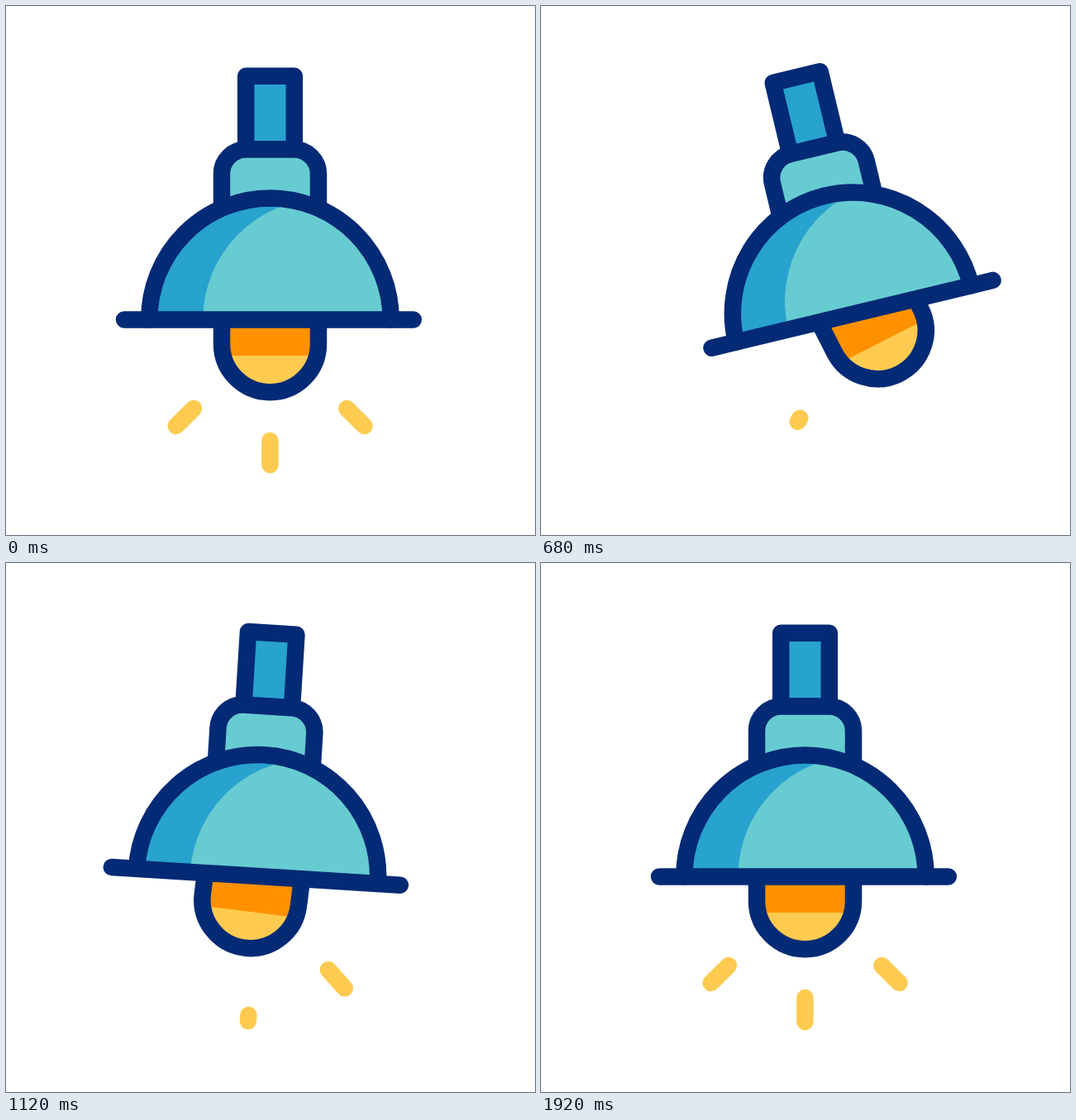
Recreate the animation shown at these times as an HTML page. Size 640 by 640 pixels, loop 2400 ms.

```html
<!DOCTYPE html>
<html lang="en">
<head>
<meta charset="utf-8">
<title>Swinging lamp</title>
<style>
  html, body { margin: 0; width: 100%; height: 100%; overflow: hidden; background: #fff; }
  svg { display: block; width: 100%; height: 100%; }
  .ink { stroke: #032a75; stroke-width: 20.5; stroke-linecap: round; stroke-linejoin: round; }
  .ray { stroke: #fecb50; stroke-width: 20.5; stroke-linecap: round; }
  .blue { fill: #28a2ce; }
  .teal { fill: #67ccd1; }
  .none { fill: none; }
</style>
</head>
<body>
<svg viewBox="0 0 640 640">
  <defs>
    <clipPath id="domeClip"><path d="M173.3 379.4A146.2 147 0 0 1 465.7 379.4Z"/></clipPath>
    <clipPath id="bulbClip"><path d="M261 366V408.7A58.5 58.5 0 0 0 378 408.7V366Z"/></clipPath>
  </defs>
  <g id="lamp">
    <g id="bulb">
      <g clip-path="url(#bulbClip)">
        <rect x="250" y="360" width="140" height="120" fill="#fecb50"/>
        <rect x="250" y="360" width="140" height="63" fill="#ff9100"/>
      </g>
      <path class="ink none" d="M261 372V408.7A58.5 58.5 0 0 0 378 408.7V372"/>
    </g>
    <rect class="ink blue" x="290.2" y="84.8" width="58.6" height="88.6"/>
    <path class="ink teal" d="M261 250V203A29.5 29.5 0 0 1 290.5 173.5H348.5A29.5 29.5 0 0 1 378 203V250"/>
    <g clip-path="url(#domeClip)">
      <rect class="blue" x="160" y="220" width="320" height="170"/>
      <circle class="teal" cx="384.5" cy="379.4" r="146.2"/>
      <rect class="teal" x="384" y="220" width="100" height="170"/>
    </g>
    <path class="ink none" d="M173.3 379.4A146.2 147 0 0 1 465.7 379.4"/>
    <path class="ink" d="M143 379.4H492.8"/>
    <line class="ray"/><line class="ray"/><line class="ray"/>
  </g>
</svg>
<script>
const LOOP = 2400;
const lamp = document.getElementById('lamp');
const bulb = document.getElementById('bulb');
const lines = document.querySelectorAll('.ray');

// [time, degrees]
const swing = [[0, 0], [580, -17.6], [980, 8], [1320, -3.9], [1620, 2], [1920, 0]];

// Inner and outer end; start times of: shrink, grow, shrink, grow
const rays = [
  { from: [227, 487], to: [205.7, 508], starts: [0, 638, 880, 1300] },
  { from: [319.4, 526], to: [319.4, 555], starts: [133, 700, 1008, 1390] },
  { from: [412.3, 487], to: [433.5, 508], starts: [267, 841, 1136, 1498] }
];
const TRIM = 167;

const smooth = x => {
  x = Math.min(1, Math.max(0, x));
  return x * x * (3 - 2 * x);
};

function angleAt(t) {
  for (let i = 1; i < swing.length; i++) {
    const [t0, a0] = swing[i - 1], [t1, a1] = swing[i];
    if (t < t1) return a0 + (a1 - a0) * smooth((t - t0) / (t1 - t0));
  }
  return 0;
}

function drawRay(line, { from, to, starts }, t) {
  const p = starts.map(s => smooth((t - s) / TRIM));
  const again = t >= starts[1];
  const regrown = t >= starts[3];
  const head = regrown ? p[3] : again ? p[1] : 1;
  const tail = regrown ? 0 : again ? p[2] : p[0];
  const at = (k, i) => from[i] + (to[i] - from[i]) * k;
  line.setAttribute('x1', at(tail, 0));
  line.setAttribute('y1', at(tail, 1));
  line.setAttribute('x2', at(head, 0));
  line.setAttribute('y2', at(head, 1));
  line.style.visibility = head - tail > 0.002 ? 'visible' : 'hidden';
}

function draw(t) {
  const a = angleAt(t);
  lamp.setAttribute('transform', `rotate(${a} 319.4 129)`);
  bulb.setAttribute('transform', `rotate(${a} 319.4 308)`);
  rays.forEach((ray, i) => drawRay(lines[i], ray, t));
}

const begin = performance.now();
function tick() {
  draw((performance.now() - begin) % LOOP);
  requestAnimationFrame(tick);
}
tick();
</script>
</body>
</html>
```
